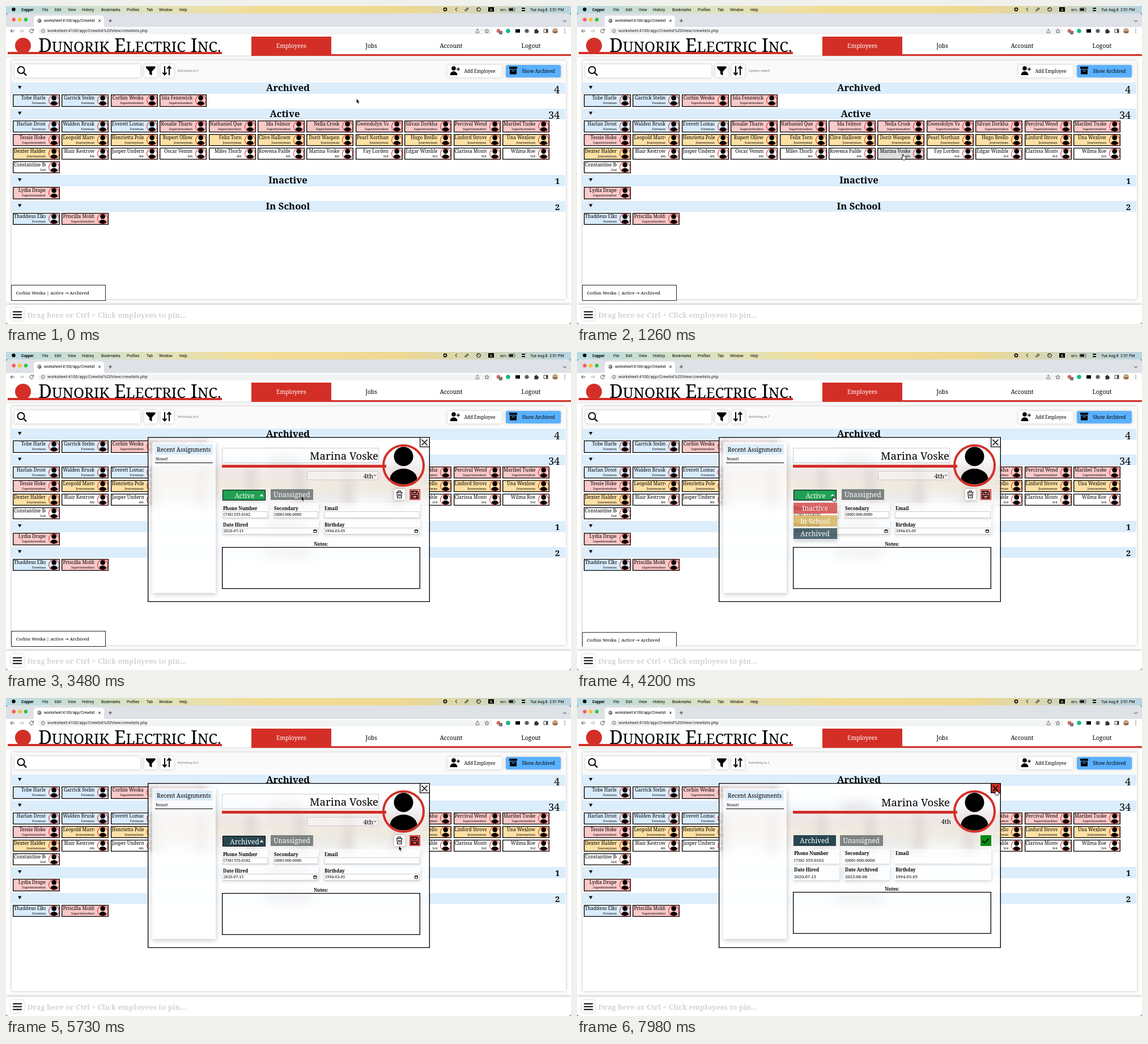
Animation of 997 by 561 pixels, one loop 8 s. Source, as an HTML page:

```html
<!DOCTYPE html>
<html lang="en">
<head>
<meta charset="utf-8">
<title>Crew list</title>
<style>
html, body { margin: 0; width: 100%; height: 100%; overflow: hidden; background: #5b9dbd; }
#stage { position: relative; width: 997px; height: 561px; overflow: hidden; color: #000; font-family: "Noto Serif", serif; }
.layer { position: absolute; inset: 0; }
.box, .text { position: absolute; box-sizing: border-box; }
.text { white-space: nowrap; line-height: 0; }
svg { position: absolute; left: 0; top: 0; overflow: visible; }
.ui { font-family: Roboto, Arial, sans-serif; }
.raised { background: #fff; border-radius: 3px; box-shadow: 0 0 5px #0003; }
.field { background: #fff8; box-shadow: 1px 3px 5px #0002; }
.input { background: #fff6; border: 1px solid #ccc; }
.edge { box-shadow: inset 0 0 0 1.35px #000; }
.tile div { position: absolute; left: 2px; width: 56px; overflow: hidden; white-space: nowrap; text-align: right; }
.tile .name { top: 1px; height: 11px; font-size: 8.3px; line-height: 10px; }
.tile .role { top: 11px; height: 9px; font-size: 5.6px; line-height: 9px; }
.tile .shade { left: 0; top: 0; width: 100%; height: 100%; background: #000; opacity: 0; }
#frost { background: #ffffffb8; backdrop-filter: blur(9px); }
</style>
</head>
<body>
<div id="stage">
  <div class="layer" id="page"></div>
  <div class="layer" id="toast" style="height:520px;overflow:hidden"></div>
  <div class="layer" id="modal"></div>
  <svg id="pointer" width="997" height="561"></svg>
</div>
<script>
const RED = '#d32f27', BAR = '#dcedfc', NAVY = '#274550';
const $ = id => document.getElementById(id);

const box = (x, y, w, h, style = '', inner = '', cls = '', id = '') =>
  `<div id="${id}" class="box ${cls}" style="left:${x}px;top:${y}px;width:${w}px;height:${h}px;${style}">${inner}</div>`;
const SHIFT = { left: 0, center: -50, right: -100 };
const text = (x, y, size, str, style = '', align = 'left', cls = '') =>
  `<div class="text ${cls}" style="left:${x}px;top:${y}px;font-size:${size}px;transform:translateX(${SHIFT[align]}%);${style}">${str}</div>`;
const ui = (x, y, size, str, style = '') => text(x, y, size, str, style, 'left', 'ui');
const svg = inner => `<svg width="997" height="561">${inner}</svg>`;
const line = (d, color = '#000', width = 1) =>
  `<path d="${d}" fill="none" stroke="${color}" stroke-width="${width}"/>`;
const fill = (d, color = '#000') => `<path d="${d}" fill="${color}"/>`;
const dot = (x, y, r, color = '#000') => `<circle cx="${x}" cy="${y}" r="${r}" fill="${color}"/>`;
const ring = (x, y, r, color = '#000', width = 1) =>
  `<circle cx="${x}" cy="${y}" r="${r}" fill="none" stroke="${color}" stroke-width="${width}"/>`;
const avatar = (x, y, scale) => `<g transform="translate(${x} ${y}) scale(${scale})">
  ${dot(0, -16, 17)}${fill('M-24 24A24 18.5 0 0 1 24 24A35 35 0 0 1-24 24Z')}${ring(0, 0, 35.5, RED, 4)}</g>`;

const ROLES = {
  F: ['Foreman', '#d9ecfd'], S: ['Superintendent', '#fcc9c9'], J: ['Journeyman', '#fde0a4'],
  4: ['4th', '#fff'], 3: ['3rd', '#fff'], 2: ['2nd', '#fff']
};
const SECTIONS = [
  { title: 'Archived', y: 135, count: 4, drop: 2, roles: 'FFSS',
    names: 'Tobe Harle,Garrick Stelm,Corbin Weska,Isla Fennwick' },
  { title: 'Active', y: 180.5, count: 34, drop: 2, roles: 'FFFSSSSSSSSSJJJJJJJJJJJ44444433332',
    names: 'Harlan Drost,Walden Brusky,Everett Lomack,Rosalie Tharnd,Nathaniel Quenlow,Ida Felmor,' +
      'Nella Crosk,Gwendolyn Varrowick,Silvan Dorkham,Percival Wendlock,Maribel Tuske,' +
      'Tessie Hoke,Leopold Marrowitt,Henrietta Pole,Rupert Ollow,Felix Torn,Clive Hallowmer,' +
      'Dorit Waspen,Pearl Northam,Hugo Brello,Linford Stroven,Una Wexlow,' +
      'Dexter Haldermont,Blair Kestrow,Jasper Undermoor,Oscar Vemm,Miles Thorb,Rowena Paldeck,' +
      'Marina Voske,Fay Lorden,Edgar Wimble,Clarissa Monterel,Wilma Roe,Constantine Belder' },
  { title: 'Inactive', y: 298, count: 1, drop: 0, roles: 'S', names: 'Lydia Drape' },
  { title: 'In School', y: 343.5, count: 2, drop: 1, roles: 'FS', names: 'Thaddeus Elkmore,Priscilla Moldren' }
];
const tiles = [];

function tile(name, role, x, y) {
  tiles.push({ x, y });
  const [label, color] = ROLES[role];
  return box(x, y, 83, 21.5, `background:${color}`,
    `<div class="shade"></div><div class="name">${name}</div><div class="role">${label}</div>` +
    `<svg>${avatar(72.7, 10.5, 0.258)}</svg>`, 'tile edge');
}

function section({ title, y, count, drop, roles, names }) {
  const cells = names.split(',').map((name, i) =>
    tile(name, roles[i], 12 + (i % 11) * 86.4, y + 21.2 + Math.floor(i / 11) * 24));
  const center = title === 'Active' ? 492 : 497.5;
  // Old-style figures: 1 and 2 are only as tall as small letters
  const size = count < 3 ? 14.5 : 18;
  return box(10, y, 977, 19.5, `background:${BAR}`) +
    svg(fill(`M21 ${y + 6}h6.4l-3.2 5.6z`)) +
    text(center, y + 9, 16.6, title, 'font-weight:700', 'center') +
    text(977, y + 9.5 + drop, size, count, count < 3 ? 'font-weight:600' : '', 'right') + cells.join('');
}

function browser() {
  const menu = [[64, 'File'], [86, 'Edit'], [109, 'View'], [134, 'History'], [168, 'Bookmarks'],
    [213, 'Profiles'], [248, 'Tab'], [270, 'Window'], [306, 'Help']];
  return box(0, 0, 997, 13, 'background:linear-gradient(90deg,#b9dbe2,#dfe3bd 25%,#f3dc94 45%,#efd890 70%,#b8d5e2)') +
    ui(27, 6.5, 6.7, 'Copper', 'font-weight:700') + menu.map(([x, s]) => ui(x, 6.5, 6.7, s)).join('') +
    ui(872, 6.5, 6, '80%') + ui(925, 6.5, 6.9, 'Tue Aug 8&nbsp; 2:51 PM') +
    box(0, 13, 997, 24, 'background:#dee1e6;border-radius:5px 5px 0 0') +
    box(49, 17, 124, 21, 'background:#fff;border-radius:5px 5px 0 0') +
    box(67, 20, 91, 12, 'overflow:hidden', ui(0, 6, 6.8, 'worksheet:4100/app/Crewlist V')) +
    box(0, 37, 997, 16, 'background:#fff') +
    box(57, 38.5, 801, 11.5, 'background:#f1f3f4;border-radius:6px') +
    ui(73, 44.3, 7.5, 'worksheet:4100/app/Crewlist%20View/crewlists.php', 'color:#222') +
    svg(dot(13.5, 6, 3.2) + ring(775, 6, 2.6, '#000', 1.6) + line('M796 3l-3 3 3 3') +
      line('M809 9l5-6 2 2-5 4') + ring(834, 6, 3.4) + line('M834 6l-2-2') +
      fill('M851 2h10v8h-10z') + `<text x="856" y="8.5" fill="#fff" font-size="7" text-anchor="middle" class="ui">A</text>` +
      `<rect x="887" y="3.5" width="11" height="5.5" rx="1.5" fill="none" stroke="#333" stroke-width=".8"/>` +
      fill('M888 4.5h7v3.5h-7z') + line('M910 4h6M910 8h6', '#000', 2.2) +
      dot(13.7, 24, 3.2, '#fc5b57') + dot(24.3, 24, 3.2, '#fdbc2e') + dot(35, 24, 3.2, '#28c840') +
      dot(59, 26, 3.4, '#666') + line('M56 25l3 1 3-2M58 23v5', '#fff', .7) +
      line('M163 24l4 4m0-4l-4 4M181 26h6m-3-3v6M983 25l3 3 3-3', '#333') +
      line('M15 44H8m3-3-3 3 3 3', '#444') + line('M24 44h7m-3-3 3 3-3 3', '#aaa') +
      line('M47.5 42a3.3 3.3 0 1 0 .7 3M48.5 40v3h-3', '#444') + ring(65.3, 44, 3, '#555', .8) +
      line('M65.3 43.5v2.2M65.3 42v.7', '#555', .8) +
      line('M829 44v3.5h5.5V44M831.8 45.5v-5m-2 2 2-2 2 2', '#555', .8) +
      line('M848.5 40.5l1.1 2.5 2.6.2-2 1.8.6 2.6-2.3-1.4-2.3 1.4.6-2.6-2-1.8 2.6-.2z', '#444', .8) +
      dot(869, 44, 3.4, '#d9685e') + fill('M870 44h6v6h-6z', '#777') + dot(886, 44, 3.8, '#15b886') +
      fill('M899 41h8v6h-8z') + line('M901 47.5h4', '#fff') + dot(919, 44, 3.6, '#53616b') +
      fill('M932.5 42h2v-1.5h2.4V42h2v2.2h1.4v2h-1.4v2h-6.4z', '#333') +
      line('M949 41h7v6h-7zM954.5 41v6', '#444') + fill('M953 41h3v6h-3z', '#444') +
      dot(969, 44, 5, '#c9a27e') + fill('M965 45h8v2h-8z', '#76513e') +
      [41, 44, 47].map(y => dot(986, y, .8, '#444')).join(''));
}

function header() {
  const small = s => `<span style="font-size:25.7px">${s}</span>`;
  const nav = [['Jobs', 644.5], ['Account', 785.5], ['Logout', 926.5]];
  return box(0, 53, 997, 34, 'background:#fff;box-shadow:0 2px 5px #0002') +
    box(3, 81, 377.5, 4, `background:${RED}`) + svg(dot(30, 70, 14, RED)) +
    text(57, 68.5, 33, `D${small('UNORIK')} E${small('LECTRIC')} I${small('NC.')}`,
      'font-family:"Liberation Serif",serif') +
    box(433, 85, 564, 2.5, `background:${RED}`) + box(433, 54, 141, 33, `background:${RED}`) +
    text(503.5, 70, 10.3, 'Employees', 'color:#fff', 'center') +
    nav.map(([s, x]) => text(x, 70, 10.3, s, '', 'center')).join('');
}

function toolbar() {
  return box(9.5, 95.5, 978, 421, 'background:#fff;box-shadow:0 0 5px #0004') +
    box(10, 96, 977, 38, 'background:#fafafa') +
    box(15, 103, 221.5, 23, '', '', 'raised') + box(244, 103, 23, 23, '', '', 'raised') +
    box(273, 103, 23, 23, '', '', 'raised') + box(779, 104, 95.5, 22, '', '', 'raised') +
    box(882, 104, 97, 22, 'background:#5ab1ff', '', 'raised') +
    text(836, 114.5, 8, 'Add Employee', '', 'center') +
    text(939.5, 114.5, 8, 'Show Archived', '', 'center') +
    `<div id="status" class="text" style="left:303px;top:114px;font-size:5.1px;color:#777"></div>` +
    svg(ring(26.5, 113, 6, '#000', 2) + line('M31 117.5l5 5', '#000', 2.4) +
      fill('M247 106.5h16.5v2.5l-6 6.5v7l-4.5-2.5v-4.5l-6-6.5z') +
      line('M280 106v15m-3.5-3.5 3.5 4 3.5-4M288 122v-15m-3.5 3.5 3.5-4 3.5 4', '#000', 2) +
      dot(790, 110, 3.8) + fill('M783.5 122c0-9 13-9 13 0z') + line('M795 111.5h6m-3-3v6', '#000', 1.4) +
      fill('M888 107h14v4h-14zM889 112h12v8.5h-12z') + line('M892.5 114.5h5', '#5ab1ff', 1.3));
}

function pinBar() {
  return box(0, 527, 997, 34, 'background:#fff;border-radius:0 0 5px 5px;box-shadow:0 -1px 5px #0004') +
    box(9, 533, 22, 22, '', '', 'raised') + svg(line('M12 539.5h16M12 544.5h16M12 549.5h16', '#000', 2)) +
    text(37.5, 545, 12.8, 'Drag here or Ctrl + Click employees to pin...', 'font-weight:700;color:#d4d4d4');
}

$('page').innerHTML = box(0, 53, 997, 508, 'background:#fff;border-radius:0 0 5px 5px') +
  header() + browser() + toolbar() + SECTIONS.map(section).join('') + pinBar();
$('toast').innerHTML = box(8.5, 492, 167, 27.5, 'background:#fff;border:1px solid #222',
  text(8, 12.8, 7.9, 'Corbin Weska | Active <span style="font-family:\'DejaVu Sans\',sans-serif">→</span> Archived'));
$('modal').innerHTML = box(249.5, 150, 498.5, 290.5, '', '', 'edge', 'frost') + '<div class="layer" id="card"></div>';

const bold = (x, y, s, align) => text(x, y, 8, s, 'font-weight:700', align);
const button = (x, y, w, label, color, style = '') =>
  box(x, y, w, 19.5, `background:${color};${style}`, text(w / 2, 9.5, 11.8, label, 'color:#fff', 'center'));
const calendar = (x, y) => line(`M${x - 2.5} ${y - 2}h5v4.5h-5z`) + line(`M${x - 2.5} ${y - 1.5}h5`, '#000', 1.6);

function fields({ edit, status }) {
  const archived = status === 'Archived' && !edit;
  const list = [
    [381, 0, 82, 'Phone Number', '(738) 555-0162'], [471, 0, 81, 'Secondary', '(000) 000-0000'],
    [560, 0, 170.5, 'Email', ''], [381, 1, archived ? 82 : 171, 'Date Hired', '2020-07-15'],
    [560, 1, 170.5, 'Birthday', '1994-03-05']];
  if (archived) list.push([471, 1, 81, 'Date Archived', '2023-08-08']);
  return list.map(([x, row, w, label, value]) => {
    const y = 266 + row * 29.3;
    return box(x, y, w, 26, '', '', 'field') + bold(x + 2, y + (edit ? 9.8 : 7.5), label) +
      (edit ? box(x + 1, y + 15, w - 2, 12, '', '', 'input') + text(x + 3, y + 20.8, 6.9, value) +
        (row ? svg(calendar(x + w - 6.5, y + 20.6)) : '')
        : text(x + 2, y + 19.5, 7.7, value));
  }).join('');
}

function card(state) {
  const { edit, status, menu, hot } = state, shift = edit ? 2 : 0;
  const statusColor = status === 'Active' ? '#1fa052' : NAVY;
  let html = box(258, 159, 111.5, 266, 'background:#fff9;box-shadow:1px 3px 8px #0003') +
    box(262.5, 163, 102.5, 17.5, `background:${BAR}`) +
    text(313.7, 171.5, 10, 'Recent Assignments', '', 'center') + text(264, 188, 7.7, 'None!') +
    box(263, 194.5, 102, 1, 'background:#000') +
    (edit ? box(381, 169, 277, 27, '', '', 'input') + box(531, 210, 126, 16, '', '', 'input') : '') +
    text(658 - shift / 2, 184 - shift / 2, 18.6, 'Marina Voske', '', 'right') +
    text(edit ? 648 : 660, 217.5 + shift / 2, 11.4, '4th', '', 'right') +
    box(381, 199, 290, 4.5, `background:${RED}`) + svg(avatar(701.5, 200.3, 1)) + fields(state) +
    button(edit ? 382 : 381.5, 241.5 + shift / 2, edit ? 76 : 75, status, statusColor, edit ? 'border:1px solid #000' : '') +
    button(464 + shift * 1.3, 241.5, 75.5, 'Unassigned', '#7d8482') +
    bold(556, 336.5 + shift, 'Notes:', 'center') +
    box(381, 341.5 + shift, 349.5, 74.5, 'background:#fff6', '', 'edge') +
    box(712, 242, 18.5, 19, 'border:1px solid', '', '', 'action') +
    box(729.5, 150, 18, 18, '', '', 'edge', 'close');
  let icons = line('M733.5 154.5l10 10m0-10l-10 10', '#000', 1.5);
  if (edit) {
    html += box(685, 242, 18.5, 19, '', '', 'raised');
    icons += fill('M447.5 254.5h7l-3.5-4z', '#fff') + line('M649 216.5l2 2 2-2') +
      line('M688.5 247.5h11M692 247v-2h4v2M690 248l.7 9.5h7l.7-9.5M693 250v5M695.5 250v5', '#000', 1.2) +
      line('M715 245.5h10l2.5 2.5v10h-12.5zM718 246v4h6v-4M717.5 258v-5h7.5v5', '#000', 1.5);
  } else if (status === 'Active') {
    icons += line('M721 246.5h-5.5v11h10.5v-5M719 254l.5-2.8 6.5-6.5 2.2 2.2-6.5 6.5z', '#000', 1.4);
  } else icons += line('M715.5 252l3.5 3.7 7.5-7.5', '#000', 1.8);
  if (menu) {
    html += box(381.5, 265, 77, 66, 'box-shadow:1px 3px 6px #0003') +
      button(381.5, 265.7, 77, 'Inactive', '#d64a4ad9') + button(381.5, 288, 77, 'In School', '#d6b45cd9') +
      button(381.5, 310.5, 77, 'Archived', hot ? '#1f3f4d' : '#274550cc', hot ? 'border:1px solid #000' : '');
  }
  return html + svg(icons);
}

// Cursor stops: arrival time, departure time, x, y of the tip
const STOPS = [
  [-400, -200, 590, 212], [0, 150, 618.5, 163.5], [1000, 1600, 575, 262], [2250, 2750, 716.5, 253.5],
  [3850, 4300, 452, 254.5], [4850, 5250, 424, 323], [5850, 6750, 724, 254], [7550, 8000, 739, 162]];
const CLICKS = [1330, 2560, 5020, 5930];
const clamp = v => Math.max(0, Math.min(1, v));
const ease = v => { v = clamp(v); return v * v * (3 - 2 * v); };

function cursor(t) {
  let i = STOPS.length - 1;
  while (i > 0 && t < STOPS[i][0]) i--;
  const [, leave, x, y] = STOPS[i], next = STOPS[i + 1];
  if (!next || t <= leave) return { x, y, hand: i > 1 };
  const k = ease((t - leave) / (next[0] - leave));
  return { x: x + (next[2] - x) * k, y: y + (next[3] - y) * k, hand: i > 0 && k > .93 };
}

function drawPointer(t) {
  const { x, y, hand } = cursor(t);
  const shape = hand
    ? 'M-.8 0q.8-.9 1.6 0v3q1.2-.6 1.7.3 1.2-.4 1.6.5 1.2-.1 1.2 1v2.2l-1.1 2.5h-4l-2.6-3.6q0-1.2 1.6-.2z'
    : 'M0 0v8l1.8-1.6 1.3 3 1.4-.6-1.3-2.9h2.5z';
  const clicking = CLICKS.some(c => t >= c && t < c + 210);
  $('pointer').innerHTML = (clicking ? ring(x, y, 15, '#111', 1.6) : '') +
    `<path transform="translate(${x} ${y})" d="${shape}" fill="${hand ? '#fff' : '#000'}" stroke="${hand ? '#000' : '#fff'}" stroke-width="${hand ? .9 : .5}"/>`;
}

function shadeTiles(t) {
  const trail = Array.from({ length: 10 }, (_, i) => cursor(Math.min(t, 1500) - i * 20));
  document.querySelectorAll('.shade').forEach((el, i) => {
    const { x, y } = tiles[i];
    const hits = trail.filter(p => p.x > x && p.x < x + 83 && p.y > y && p.y < y + 21.5).length;
    el.style.opacity = hits / trail.length * .13;
  });
}

const statusLine = t => t < 700 ? 'Refreshing in 3' : t < 2800 ? 'Updates added!'
  : `Refreshing in ${8 - Math.floor((t - 2800) / 1000)}`;
const mix = (a, b, k) => `rgb(${a.map((v, i) => Math.round(v + (b[i] - v) * k))})`;
const WHITE = [255, 255, 255], CRIMSON = [211, 47, 39], GREEN = [10, 138, 20];

let shown = '';
function render(t) {
  $('status').textContent = statusLine(t);
  $('toast').firstChild.style.transform = `translateY(${32 * ease((t - 4120) / 500)}px)`;
  shadeTiles(t);
  $('modal').style.display = t >= 1450 ? '' : 'none';
  const state = {
    edit: t >= 2650 && t < 6020, status: t < 5200 ? 'Active' : 'Archived',
    menu: t >= 3800 && t < 5200, hot: t >= 4780
  };
  const key = JSON.stringify(state);
  if (key !== shown) { $('card').innerHTML = card(state); shown = key; }
  const action = $('action').style, done = ease((t - 6350) / 550);
  action.background = state.edit ? (t > 4500 ? '#e8585b' : '#ed8586')
    : t >= 6020 ? mix([215, 205, 205], GREEN, done) : mix(WHITE, [250, 205, 203], ease((t - 2180) / 200));
  action.borderColor = mix(CRIMSON, GREEN, t < 6020 ? 0 : done);
  $('close').style.background = mix(WHITE, CRIMSON, ease((t - 7420) / 200));
  drawPointer(t);
}

const start = performance.now();
function tick(now) {
  render(Math.max(0, now - start) % 8000);
  requestAnimationFrame(tick);
}
render(0);
requestAnimationFrame(tick);
</script>
</body>
</html>
```
